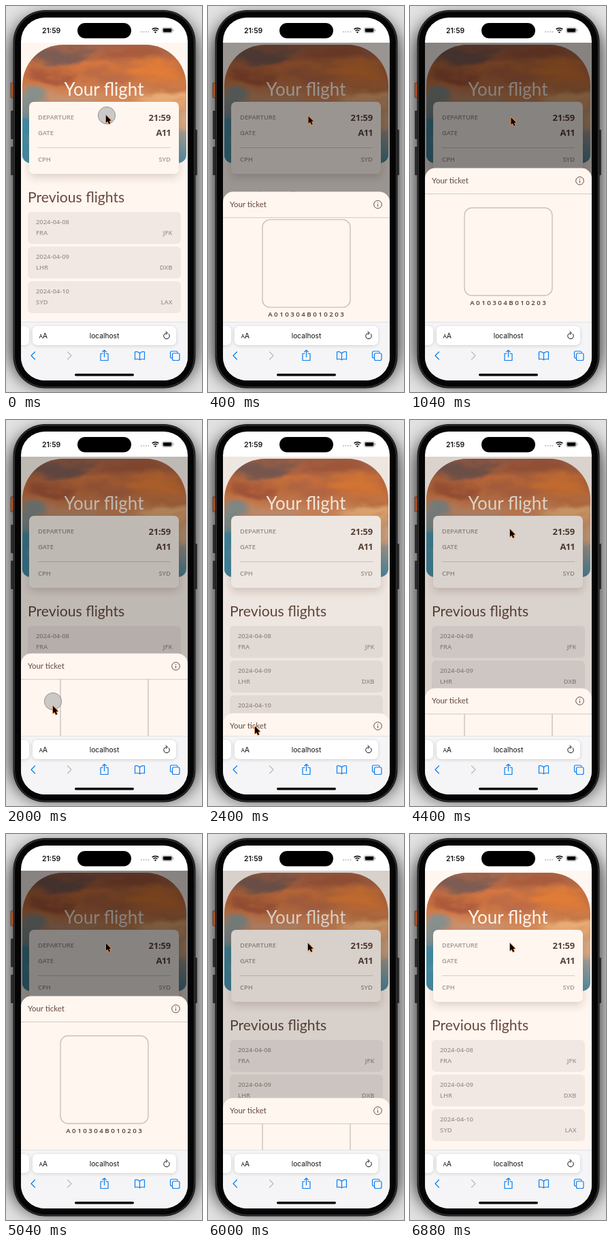
An HTML page for the animation above (6960 ms loop, 288 by 568 pixels).

```html
<!DOCTYPE html>
<html lang="en">
<head>
<meta charset="utf-8">
<title>Flight ticket sheet</title>
<style>
  html, body { margin: 0; width: 100%; height: 100%; overflow: hidden; background: #d8d8d8; }
  svg { display: block; width: 288px; height: 568px; }
  text { font-family: "Open Sans", "Noto Sans", sans-serif; font-weight: 600; font-size: 9.4px; fill: #a3958e; }
  .head { font-family: Lato, sans-serif; font-weight: 400; fill: #65493d; }
  .value { font-size: 13px; font-weight: 700; letter-spacing: -.2px; fill: #5a4238; }
  .ui { font-family: Inter, sans-serif; font-weight: 400; fill: #111; }
  .end { text-anchor: end; }
  .mid { text-anchor: middle; }
  .icon { fill: none; stroke: #0a7cf0; stroke-width: 1.2; stroke-linecap: round; stroke-linejoin: round; }
</style>
</head>
<body>
<svg viewBox="0 0 288 568">
  <defs>
    <filter id="soft" x="-50%" y="-50%" width="200%" height="200%"><feGaussianBlur stdDeviation="13"/></filter>
    <filter id="cloud" x="-20%" y="-20%" width="140%" height="140%">
      <feGaussianBlur stdDeviation="5" result="blur"/>
      <feTurbulence type="fractalNoise" baseFrequency=".018 .035" numOctaves="4" seed="4" result="noise"/>
      <feDisplacementMap in="blur" in2="noise" scale="34" xChannelSelector="R" yChannelSelector="G"/>
    </filter>
    <filter id="drop" x="-20%" y="-20%" width="140%" height="150%">
      <feDropShadow dx="0" dy="5" stdDeviation="6" flood-color="#5a3a2a" flood-opacity=".2"/>
    </filter>
    <filter id="pill" x="-10%" y="-30%" width="120%" height="170%">
      <feDropShadow dx="0" dy="1" stdDeviation="2.5" flood-opacity=".16"/>
    </filter>
    <linearGradient id="sky" x2="0" y2="1">
      <stop offset="0" stop-color="#a8644a"/>
      <stop offset=".25" stop-color="#c9713f"/>
      <stop offset=".5" stop-color="#d58f62"/>
      <stop offset=".72" stop-color="#a59b92"/>
      <stop offset="1" stop-color="#4a8ba3"/>
    </linearGradient>
    <clipPath id="screen"><rect x="22" y="17" width="245" height="534" rx="35"/></clipPath>
    <clipPath id="page"><rect x="22" y="54" width="245" height="411"/></clipPath>
    <clipPath id="hero"><path d="M24 117A60 60 0 0 1 84 57H205A60 60 0 0 1 265 117V219A12 12 0 0 1 253 231H36A12 12 0 0 1 24 219Z"/></clipPath>
    <clipPath id="body"><rect x="22" y="276" width="245" height="260"/></clipPath>
  </defs>

  <rect width="288" height="568" fill="#e2e2e2"/>
  <rect x="7" y="16" width="274" height="542" rx="50" opacity=".8" filter="url(#soft)"/>

  <rect x="7" y="113" width="5" height="22" rx="1" fill="#b9501f" stroke="#3a2a24" stroke-width=".7"/>
  <g fill="#2c2c2c">
    <rect x="7" y="154" width="5" height="42" rx="1"/>
    <rect x="7" y="207" width="5" height="42" rx="1"/>
    <rect x="276" y="182" width="5" height="67" rx="1"/>
  </g>
  <rect x="10.5" y="6" width="268" height="556.5" rx="47" fill="#1c1c1c"/>
  <rect x="12.5" y="8" width="264" height="552.5" rx="45" fill="#050505" stroke="#444" stroke-width=".8"/>

  <g clip-path="url(#screen)">
    <rect x="22" y="17" width="245" height="534" fill="#fff"/>
    <g clip-path="url(#page)">
      <rect x="22" y="54" width="245" height="411" fill="#fff6f0"/>
      <g clip-path="url(#hero)">
        <rect x="24" y="57" width="241" height="174" fill="url(#sky)"/>
        <g filter="url(#cloud)">
          <ellipse cx="75" cy="70" rx="50" ry="14" fill="#7d5c52"/>
          <ellipse cx="182" cy="66" rx="45" ry="7" fill="#a85a3a"/>
          <ellipse cx="218" cy="94" rx="46" ry="15" fill="#e07c38"/>
          <ellipse cx="125" cy="88" rx="44" ry="7" fill="#d9773f"/>
          <ellipse cx="62" cy="104" rx="34" ry="8" fill="#a8573a"/>
          <ellipse cx="150" cy="108" rx="40" ry="6" fill="#b9694a"/>
          <ellipse cx="235" cy="122" rx="34" ry="6" fill="#c4733f"/>
          <ellipse cx="230" cy="138" rx="38" ry="8" fill="#eab078"/>
          <ellipse cx="100" cy="136" rx="50" ry="6" fill="#c3967c"/>
          <ellipse cx="34" cy="142" rx="20" ry="14" fill="#84908f"/>
          <ellipse cx="24" cy="196" rx="18" ry="42" fill="#4189a4"/>
          <ellipse cx="265" cy="164" rx="15" ry="18" fill="#d8a880"/>
        </g>
      </g>
      <text class="head mid" x="144" y="132" style="font-size:26px;fill:#fff4ec">Your flight</text>

      <rect x="34" y="141" width="220" height="106" rx="7" fill="#fff6f0" filter="url(#drop)"/>
      <text x="47" y="167.3">DEPARTURE</text>
      <text class="value end" x="242" y="168.5">21:59</text>
      <text x="47" y="189.8">GATE</text>
      <text class="value end" x="242" y="191" style="letter-spacing:-.8px">A11</text>
      <path d="M47 208.5H242" stroke="#d8cdc6"/>
      <text x="47" y="229.3">CPH</text>
      <text class="end" x="242" y="229.3">SYD</text>

      <text class="head" x="32" y="288.5" style="font-size:21.2px">Previous flights</text>
      <g id="list"></g>

      <rect id="shade" x="22" y="54" width="245" height="411" fill="#000"/>
      <g id="sheet">
        <path d="M22 500V253.5A15 15 0 0 1 37 238.5H252A15 15 0 0 1 267 253.5V500Z" fill="#fff6f0"/>
        <g clip-path="url(#body)">
          <g id="ticket">
            <rect x="80" y="297" width="129" height="129" rx="11" fill="none" stroke="#c9c1bc" stroke-width="1.4"/>
            <text class="mid" x="145.3" y="440" letter-spacing="2.5" style="font-size:9.7px;fill:#4a3a33">A010304B010203</text>
          </g>
        </g>
        <text class="head" x="32" y="261" style="font-size:11.5px">Your ticket</text>
        <g fill="none" stroke="#65493d" stroke-width="1">
          <circle cx="249.5" cy="257.2" r="5.8"/>
          <path d="M249.5 256.5V260.3M249.5 253.9V255.1"/>
        </g>
        <path d="M22 276.5H267" stroke="#d2cac5"/>
      </g>
    </g>

    <rect x="22" y="465" width="245" height="86" fill="#f5f5f7"/>
    <path d="M22 465.2H267" stroke="#d5d5d8" stroke-width=".7"/>
    <g fill="#fff" filter="url(#pill)">
      <rect x="0" y="471" width="34" height="28" rx="7"/>
      <rect x="39" y="471" width="211" height="28" rx="7"/>
    </g>
    <text class="ui" x="48.5" y="488.5" style="font-size:8px">A</text>
    <text class="ui" x="53.8" y="488.5" style="font-size:10.5px">A</text>
    <text class="ui mid" x="144.5" y="488.5" style="font-size:10.2px">localhost</text>
    <g class="icon" style="stroke:#111;stroke-width:1">
      <path d="M239.4 482.8A4.3 4.3 0 1 1 236 481.2M235 478.8L237.4 481.2L235 483.6"/>
    </g>
    <g class="icon">
      <path d="M42.5 509L37 514.5L42.5 520"/>
      <path d="M90.5 509L96 514.5L90.5 520" stroke="#bbb"/>
      <path d="M142 511.5H139V521.5H150V511.5H147M144.5 516.5V506.5M141.8 509L144.5 506.3L147.2 509"/>
      <path d="M196.5 511Q193 507.5 189.5 509V520Q193 518.7 196.5 520.8Q200 518.7 203.5 520V509Q200 507.5 196.5 511V520.8"/>
      <rect x="244.5" y="511" width="10.5" height="10.5" rx="2"/>
      <path d="M244 518H243.5A2 2 0 0 1 241.5 516V510A2 2 0 0 1 243.5 508H250A2 2 0 0 1 252 510"/>
    </g>
    <rect x="101" y="541" width="87" height="3.4" rx="1.7"/>

    <text class="ui" x="53" y="39.6" style="font-size:10.4px;font-weight:600">21:59</text>
    <rect x="105" y="25" width="79" height="22.5" rx="11.2"/>
    <g fill="#bbb">
      <circle cx="199" cy="38" r="1"/><circle cx="202.5" cy="38" r="1"/>
      <circle cx="206" cy="38" r="1"/><circle cx="209.5" cy="38" r="1"/>
    </g>
    <path d="M214.6 34.3A7.4 7.4 0 0 1 224.4 34.3M216.5 36.5A4.6 4.6 0 0 1 222.5 36.5" fill="none" stroke="#000" stroke-width="1.5"/>
    <circle cx="219.5" cy="38.6" r="1.2"/>
    <rect x="229.6" y="31.8" width="15" height="7.8" rx="2.4" fill="none" stroke="#999" stroke-width=".8"/>
    <rect x="230.8" y="33" width="12.6" height="5.4" rx="1.3"/>
    <path d="M246 34.4V37" stroke="#999" stroke-width="1"/>
  </g>

  <circle id="touch" r="12.6" fill="#c4c2c1" fill-opacity=".88" stroke="#8d8a88" stroke-width=".9"/>
  <g id="cursor">
    <path d="M0 0V10.5L2.5 8.5L4.3 12.4L6.1 11.6L4.3 7.9L7.3 7.5Z" stroke="#e58a4c" stroke-width="1.8" stroke-linejoin="round" paint-order="stroke"/>
  </g>
</svg>
<script>
  const LOOP = 6960, STEP = 80, TRAVEL = 226, SHADE = .47;
  const $ = id => document.getElementById(id);
  const [list, shade, sheet, ticket, touch, cursor] =
    ["list", "shade", "sheet", "ticket", "touch", "cursor"].map($);

  const flights = [["2024-04-08", "FRA", "JFK"], ["2024-04-09", "LHR", "DXB"], ["2024-04-10", "SYD", "LAX"]];
  list.innerHTML = flights.map(([date, from, to], i) => `
    <g transform="translate(0 ${303 + i * 51})">
      <rect x="32" width="225" height="47" rx="6" fill="#f1e8e3"/>
      <text x="44" y="18.4">${date}</text>
      <text x="44" y="33.6">${from}</text>
      <text class="end" x="244.5" y="33.6">${to}</text>
    </g>`).join("");

  const linear = u => u;
  const easeOut = u => 1 - (1 - u) ** 3;
  const smooth = u => u * u * (3 - 2 * u);

  // Each row: time, values, easing towards that row
  const openness = [
    [80, [0]], [770, [1], easeOut],
    [1440, [1]], [2000, [.535], linear], [2240, [.4], linear], [2800, [0], easeOut],
    [4320, [0]], [5010, [1], easeOut],
    [5790, [1]], [6480, [0], easeOut]
  ];
  const pointer = [
    [160, [147, 161]], [720, [148.5, 164]], [1040, [148.5, 164]], [1440, [70, 316]],
    [2000, [69, 421], linear], [2240, [69, 451], linear], [2480, [69, 451]],
    [3120, [139, 155]], [3520, [147, 161]]
  ];
  const presses = [[0, 80], [1440, 2240], [4240, 4320], [5760, 5840]];

  function at(track, t) {
    const i = track.findIndex(row => t < row[0]);
    if (i < 0) return track[track.length - 1][1];
    if (i === 0) return track[0][1];
    const [t0, a] = track[i - 1], [t1, b, ease = smooth] = track[i];
    const k = ease((t - t0) / (t1 - t0));
    return a.map((v, j) => v + (b[j] - v) * k);
  }

  const move = (el, x, y) => el.setAttribute("transform", `translate(${x} ${y})`);

  function draw(t) {
    const [open] = at(openness, t);
    const drop = (1 - open) * TRAVEL;
    shade.setAttribute("opacity", open * SHADE);
    move(sheet, 0, drop);
    move(ticket, 0, -drop / 2); // contents travel at half the sheet's speed

    const [x, y] = at(pointer, t);
    const dragging = t >= 1440 && t < 2240;
    move(cursor, x, y);
    move(touch, dragging ? x : x + 1, dragging ? y - 7 : y);
    touch.style.display = presses.some(([a, b]) => t >= a && t < b) ? "" : "none";
  }

  const start = performance.now();
  function frame() {
    const t = (performance.now() - start) % LOOP;
    draw(Math.floor(t / STEP) * STEP);
    requestAnimationFrame(frame);
  }
  draw(0);
  requestAnimationFrame(frame);
</script>
</body>
</html>
```
